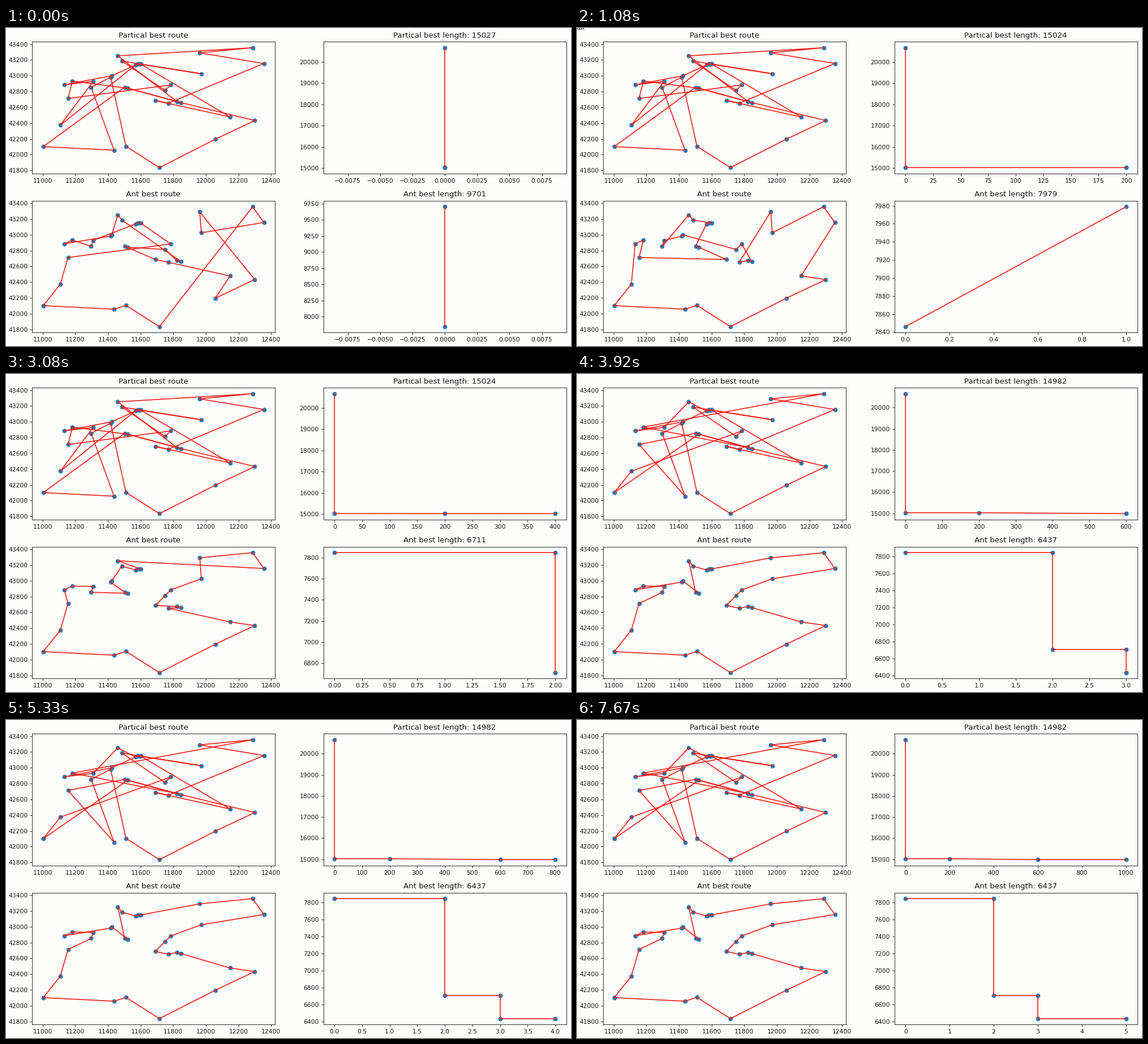
A matplotlib script for the animation above (8 s loop, 998 by 561 pixels).

```python
from math import dist

import matplotlib.pyplot as plt
from matplotlib.animation import FuncAnimation

W, H, DPI = 998, 561, 80
STEP, LOOP = 80, 8000
RED, BLUE, PAPER, INK = "#ee2018", "#1f77b4", "#fdfdfc", "#161616"

plt.rcParams.update({
    "font.family": "DejaVu Sans", "xtick.labelsize": 9.7, "ytick.labelsize": 9.7,
    "axes.titlesize": 12, "axes.titlepad": 6.8, "axes.facecolor": PAPER,
    "axes.edgecolor": INK, "xtick.color": INK, "ytick.color": INK,
    "text.color": INK,
})

# Cities, listed in the order of the best ant tour.
CITIES = [
    (11004, 42102), (11109, 42374), (11156, 42712), (11298, 42853), (11310, 42929),
    (11183, 42933), (11133, 42886), (11417, 42983), (11424, 43000), (11522, 42842),
    (11503, 42855), (11461, 43253), (11486, 43187), (11569, 43137), (11583, 43150),
    (11595, 43148), (11600, 43150), (11963, 43291), (12287, 43356), (12356, 43156),
    (11973, 43026), (11785, 42884), (11751, 42814), (11691, 42687), (11770, 42652),
    (11823, 42674), (11847, 42661), (12149, 42478), (12300, 42433), (12058, 42196),
    (11716, 41836), (11511, 42106), (11438, 42057),
]


def walk(jumps):
    """Go to the nearest unvisited city, except where a jump is given."""
    here, left, path = 0, set(range(1, len(CITIES))), [0]
    while left:
        near = min(left, key=lambda c: dist(CITIES[here], CITIES[c]))
        here = jumps.get(here, near)
        left.remove(here)
        path.append(here)
    return path


def history(first, lengths, n, step, corners):
    """Improvements up to round n, then the current value."""
    points, best = [(0, first)], first
    for k, length in enumerate(lengths[:n + 1]):
        if length < best:
            if corners:
                points.append((k * step, best))
            points.append((k * step, length))
            best = length
    return points + [(n * step, lengths[n])]


SWARM_LATE = walk({1: 21, 22: 12, 12: 20, 20: 15, 15: 14, 14: 8, 8: 6, 6: 4,
                   4: 11, 16: 27, 27: 23, 24: 19, 19: 17, 18: 5, 5: 25, 25: 10,
                   10: 2, 2: 32, 32: 3, 7: 31})
# The earlier swarm tour has five cities exchanged.
EXCHANGE = {2: 0, 0: 5, 1: 2, 11: 1, 5: 11}
SWARM_EARLY = [EXCHANGE.get(c, c) for c in SWARM_LATE]
SWARM_TOURS = [SWARM_EARLY] * 3 + [SWARM_LATE] * 3

ANT_TOURS = [
    walk({2: 21, 21: 16, 13: 4, 8: 11, 12: 26, 25: 22, 22: 9, 27: 29, 28: 17, 18: 30}),
    walk({1: 6, 5: 2, 2: 23, 23: 9, 10: 13, 11: 3, 21: 26, 24: 17, 20: 18}),
    walk({3: 9, 12: 13, 11: 19, 23: 25}),
] + [list(range(len(CITIES)))] * 3

SWARM_LENGTHS = [15027, 15024, 15024, 14982, 14982, 14982]
ANT_LENGTHS = [9701, 7979, 6711, 6437, 6437, 6437]
STARTS = [0, 1080, 2500, 3920, 5250, 6670]

fig = plt.figure(figsize=(W / DPI, H / DPI), dpi=DPI, facecolor=PAPER)


def panel(col, row, title, points):
    left, top = 46.2 + 514.5 * col, 24.2 + 280.5 * row
    width, height = 428.8, 232.7
    ax = fig.add_axes([left / W, 1 - (top + height) / H, width / W, height / H])
    x, y = zip(*points)
    ax.scatter(x, y, color=BLUE)
    ax.plot(x, y, color=RED, lw=1.5)
    ax.set_title(title)
    if max(x) == min(x):
        ax.set_xlim(-0.00938, 0.00938)
    ax.set_visible(False)
    return ax


def closed(order):
    return [CITIES[c] for c in order + order[:1]]


def build(n):
    swarm = history(20660, SWARM_LENGTHS, n, 200, False)
    ant = history(7846, ANT_LENGTHS, n, 1, True)
    return [
        panel(0, 0, "Partical best route", closed(SWARM_TOURS[n])),
        panel(1, 0, f"Partical best length: {SWARM_LENGTHS[n]}", swarm),
        panel(0, 1, "Ant best route", closed(ANT_TOURS[n])),
        panel(1, 1, f"Ant best length: {ANT_LENGTHS[n]}", ant),
    ]


groups = [build(n) for n in range(len(STARTS))]
# Lower edge of a caption cut off by the top of the stage.
scrap = fig.text(0, 1 - 2.6 / H, "ust", family="Liberation Serif", size=11,
                 va="baseline", visible=False)


def show(i):
    t = i * STEP
    now = sum(t + STEP > start for start in STARTS) - 1
    for k, group in enumerate(groups):
        for ax in group:
            ax.set_visible(k == now)
    scrap.set_visible(t > 0 and now < 2)
    return [ax for group in groups for ax in group] + [scrap]


anim = FuncAnimation(fig, show, frames=LOOP // STEP, interval=STEP,
                     init_func=lambda: show(0), repeat=True, repeat_delay=0,
                     blit=False)
plt.show()
```
